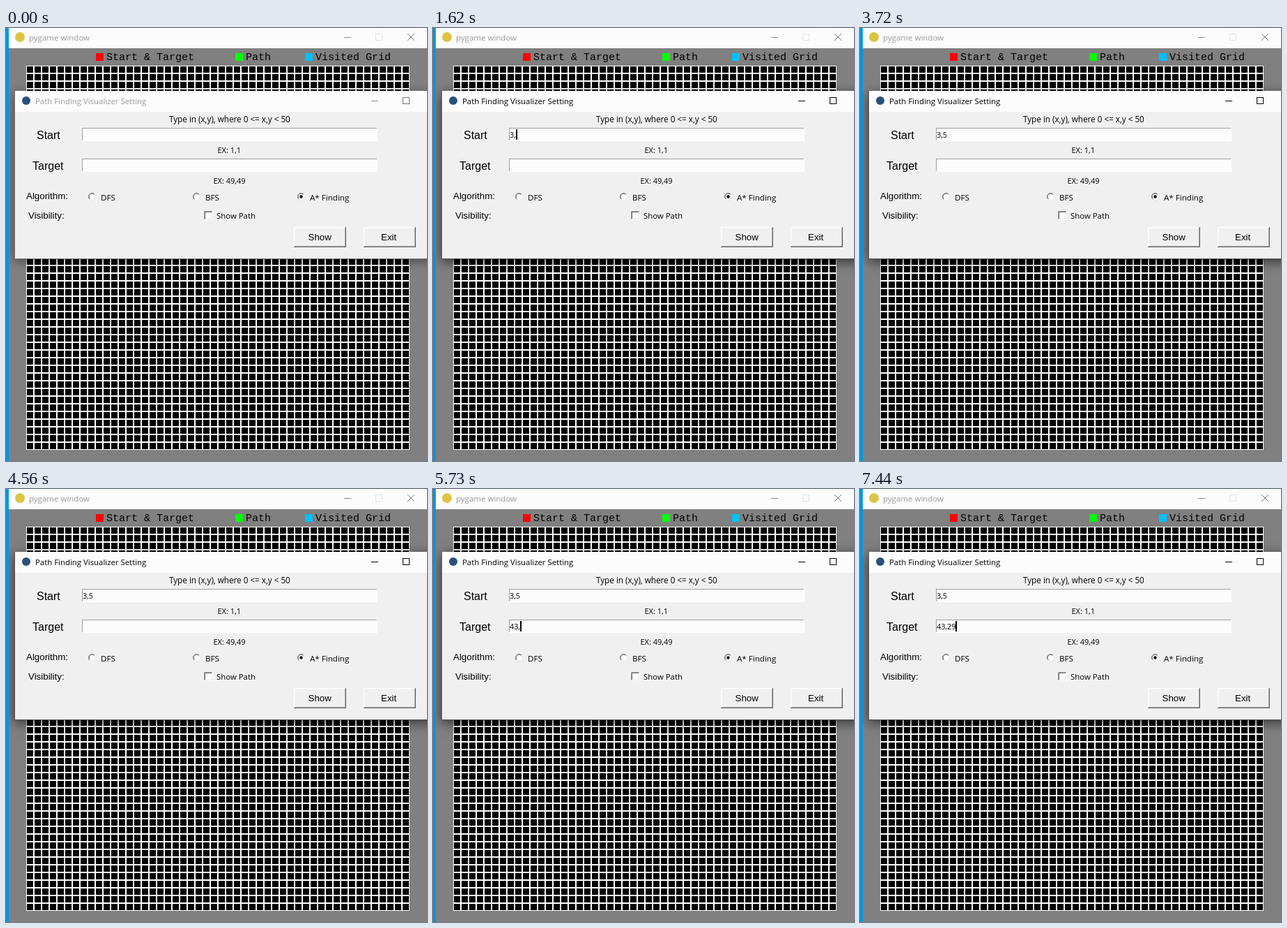
An HTML page with a canvas that plays this animation: 604x620 px, repeating every 8 s.

```html
<!DOCTYPE html>
<html lang="en">
<head>
<meta charset="utf-8">
<title>Path finding settings</title>
<style>
html, body { margin: 0; width: 100%; height: 100%; overflow: hidden; background: #808080; }
canvas { display: block; }
</style>
</head>
<body>
<canvas id="stage" width="604" height="620"></canvas>
<script>
const LOOP = 8000;
const UI = '"Open Sans", "Noto Sans", sans-serif';
const ARIAL = '"Liberation Sans", Arial, sans-serif';
const MONO = '"Liberation Mono", "Courier New", monospace';
const ENTRY_FONT = `10.8px ${UI}`;
const ENTRY_X = 110;
const PAPER = '#fcfcfc', FACE = '#f0f0f0';

const ctx = document.getElementById('stage').getContext('2d');

// [time, content] for each field; the caret list holds [time, field or null].
const startTyping = [[0, ''], [1530, '3'], [1620, '3,'], [1860, '3,5']];
const targetTyping = [[0, ''], [4770, '4'], [5280, '43'], [5370, '43,'], [6000, '43,2'], [6540, '43,29']];
const caretSteps = [
  [0, null], [750, 'start'], [1290, null], [1590, 'start'], [2160, null], [2460, 'start'], [3030, null],
  [3120, 'target'], [3720, null], [3990, 'target'], [4560, null], [4860, 'target'], [5430, null],
  [5730, 'target'], [6300, null], [6600, 'target'], [7170, null], [7440, 'target']
];

function valueAt(steps, t) {
  let value = steps[0][1];
  for (const [time, next] of steps) if (t >= time) value = next;
  return value;
}

function box(c, color, x, y, w, h) {
  c.fillStyle = color;
  c.fillRect(x, y, w, h);
}

function text(c, str, x, y, font, color = '#000') {
  c.font = font;
  c.fillStyle = color;
  c.fillText(str, x, y);
}

function disc(c, color, x, y, r) {
  c.fillStyle = color;
  c.beginPath();
  c.arc(x, y, r, 0, Math.PI * 2);
  c.fill();
}

function arc(c, color, x, y, r, from, to) {
  c.strokeStyle = color;
  c.lineWidth = 1;
  c.beginPath();
  c.arc(x, y, r, from * Math.PI, to * Math.PI);
  c.stroke();
}

// One-pixel bevel: first colour on the top and left, second on the bottom and right.
function bevel(c, topLeft, bottomRight, x, y, w, h) {
  box(c, bottomRight, x, y + h - 1, w, 1);
  box(c, bottomRight, x + w - 1, y, 1, h);
  box(c, topLeft, x, y, w - 1, 1);
  box(c, topLeft, x, y, 1, h - 1);
}

function minimize(c, color, x, y) {
  box(c, color, x, y, 10, 1);
}

function maximize(c, color, x, y) {
  c.strokeStyle = color;
  c.lineWidth = 1;
  c.strokeRect(x + .5, y + .5, 9, 9);
}

function closeMark(c, color, x, y) {
  c.strokeStyle = color;
  c.lineWidth = 1;
  c.beginPath();
  c.moveTo(x, y);
  c.lineTo(x + 10, y + 10);
  c.moveTo(x + 10, y);
  c.lineTo(x, y + 10);
  c.stroke();
}

function drawGridWindow(c) {
  box(c, '#808080', 0, 0, 604, 620);
  box(c, '#0396e0', 0, 0, 4, 620);
  box(c, PAPER, 4, 0, 600, 29);
  disc(c, '#dcc544', 20, 13, 7);
  text(c, 'pygame window', 33, 18, `11.5px ${UI}`, '#999');
  minimize(c, '#888', 485, 13);
  maximize(c, '#e4e4e4', 530, 8);
  closeMark(c, '#777', 576, 8);

  const legend = [['#f00', 129, 'Start & Target'], ['#0f0', 329, 'Path'], ['#00bfff', 429, 'Visited Grid']];
  for (const [color, x, label] of legend) {
    box(c, color, x, 36, 11, 11);
    text(c, label, x + 15, 46, `15px ${MONO}`);
  }

  box(c, '#fff', 29, 54, 550, 550);
  for (let i = 0; i < 50; i++)
    for (let j = 0; j < 50; j++) box(c, '#000', 30 + 11 * i, 55 + 11 * j, 9, 9);
}

function radio(c, x, label, chosen) {
  const y = 241.5;
  disc(c, '#fff', x, y, 5.5);
  arc(c, '#8a8a8a', x, y, 5.2, .75, 1.75);
  arc(c, '#e3e3e3', x, y, 5.2, -.25, .75);
  arc(c, '#696969', x, y, 4.3, .75, 1.75);
  if (chosen) disc(c, '#000', x, y, 2.2);
  text(c, label, x + 12.5, 247, `11.6px ${UI}`);
}

function button(c, x, label, labelX) {
  bevel(c, '#fff', '#696969', x, 285, 75, 29);
  bevel(c, '#f6f6f6', '#a0a0a0', x + 1, 286, 73, 27);
  text(c, label, labelX, 304, `13.33px ${ARIAL}`);
}

function drawDialog(c, active) {
  c.save();
  c.beginPath();
  c.rect(4, 29, 600, 591);
  c.clip();
  c.shadowColor = active ? 'rgba(0,0,0,.6)' : 'rgba(0,0,0,.45)';
  c.shadowBlur = active ? 16 : 14;
  c.shadowOffsetY = active ? 4 : 3;
  box(c, active ? '#555' : '#777', 12, 90, 640, 241);
  c.restore();

  box(c, PAPER, 13, 90, 600, 30);
  box(c, FACE, 13, 120, 600, 210);

  const ink = active ? '#000' : '#999';
  disc(c, '#29507a', 29, 104, 6);
  text(c, 'Path Finding Visualizer Setting', 42, 109, `11.4px ${UI}`, ink);
  minimize(c, active ? '#000' : '#888', 524, 104);
  maximize(c, active ? '#000' : '#777', 569, 99);

  text(c, 'Type in (x,y), where 0 <= x,y < 50', 234, 135, `11.7px ${UI}`);
  text(c, 'EX: 1,1', 303.5, 179, `11px ${UI}`);
  text(c, 'EX: 49,49', 297.5, 223, `11px ${UI}`);
  text(c, 'Start', 44, 159, `16px ${ARIAL}`);
  text(c, 'Target', 38, 203, `16px ${ARIAL}`);
  text(c, 'Algorithm:', 29, 245, `13.33px ${ARIAL}`);
  text(c, 'Visibility:', 32, 273, `13.33px ${ARIAL}`);

  for (const y of [143, 187]) {
    box(c, PAPER, 109, y, 424, 19);
    bevel(c, '#a0a0a0', '#fff', 109, y, 424, 19);
  }

  radio(c, 123.5, 'DFS', false);
  radio(c, 273.5, 'BFS', false);
  radio(c, 423.5, 'A* Finding', true);

  box(c, '#fff', 284, 262, 13, 13);
  bevel(c, '#a0a0a0', '#fff', 284, 262, 13, 13);
  bevel(c, '#696969', '#e3e3e3', 285, 263, 11, 11);
  text(c, 'Show Path', 302, 273, `11.4px ${UI}`);

  button(c, 413, 'Show', 433.5);
  button(c, 513, 'Exit', 538);
}

function drawField(content, top, hasCaret) {
  text(ctx, content, ENTRY_X, top + 12, ENTRY_FONT);
  if (!hasCaret) return;
  const x = ENTRY_X + Math.round(ctx.measureText(content).width);
  box(ctx, '#000', x, top, 2, 15);
}

function makeScene(active) {
  const layer = document.createElement('canvas');
  layer.width = 604;
  layer.height = 620;
  const c = layer.getContext('2d');
  drawGridWindow(c);
  drawDialog(c, active);
  return layer;
}

const idleScene = makeScene(false);
const activeScene = makeScene(true);
const begin = performance.now();

function render() {
  const t = Math.max(0, performance.now() - begin) % LOOP;
  const caret = valueAt(caretSteps, t);
  ctx.drawImage(t < 720 ? idleScene : activeScene, 0, 0);
  drawField(valueAt(startTyping, t), 145, caret === 'start');
  drawField(valueAt(targetTyping, t), 189, caret === 'target');
  requestAnimationFrame(render);
}
render();
</script>
</body>
</html>
```
